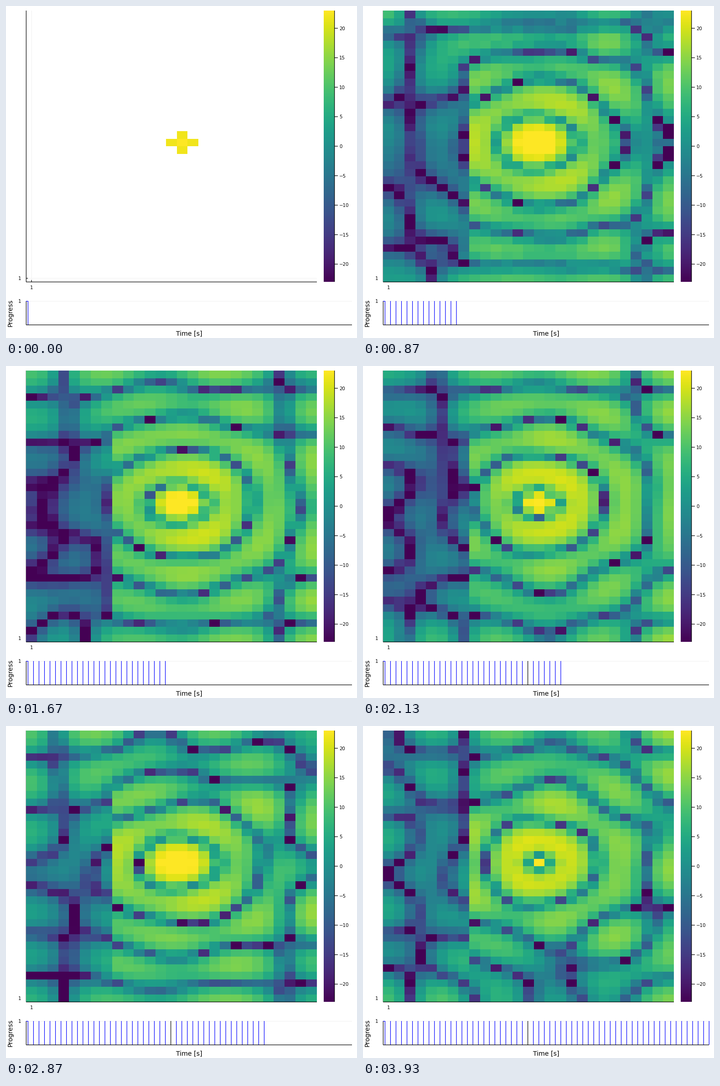
Animation of 770x727 px, one loop 3990 ms. Source, as a matplotlib script:

```python
import numpy as np
import matplotlib.pyplot as plt
from matplotlib.animation import FuncAnimation
from matplotlib.collections import LineCollection

W, H, DPI = 770, 727, 100
LOOP_MS, TICK_MS, FPS = 3990, 10, 15
SHOTS, STEPS_PER_SHOT = 60, 3

ROWS, COLS = 36, 27
SRC = (18, 14)
AMP, PERIOD = 35.0, 15
C2, DAMPING = 0.36, 0.06
WALL, SEALED, WALL_COL = slice(4, 28), slice(4, 21), 7
LEAK, WALL_LOSS = 0.1, 0.2
LIMIT = 23

PX = 72 / DPI
cmap = plt.get_cmap("viridis")


def spread(reached):
    """Grow the touched area by one cell, never through the sealed wall."""
    grown = reached.copy()
    grown[1:] |= reached[:-1]
    grown[:-1] |= reached[1:]
    gate = np.ones((ROWS, COLS - 1), bool)
    gate[SEALED, WALL_COL] = False
    grown[:, 1:] |= reached[:, :-1] & gate
    grown[:, :-1] |= reached[:, 1:] & gate
    return grown


def simulate():
    """Damped wave equation with reflecting edges and a leaky inner wall."""
    u = np.zeros((ROWS, COLS))
    u[SRC] = AMP
    prev = u.copy()
    reached = u != 0
    gate = np.ones((ROWS, COLS - 1))
    gate[WALL, WALL_COL] = LEAK
    keep = np.full_like(u, 1 - DAMPING)
    keep[WALL, WALL_COL + 1] -= WALL_LOSS
    shots = []
    for n in range(STEPS_PER_SHOT * (SHOTS - 1) + 1):
        fx = np.diff(u, axis=1) * gate
        fy = np.diff(u, axis=0)
        lap = np.zeros_like(u)
        lap[:, :-1] += fx
        lap[:, 1:] -= fx
        lap[:-1] += fy
        lap[1:] -= fy
        u, prev = u + keep * (u - prev) + C2 * lap, u
        u[SRC] = AMP * np.cos(2 * np.pi * (n + 1) / PERIOD)
        reached = spread(reached)
        if n % STEPS_PER_SHOT == 0:
            shots.append((u, reached))
    return shots


def to_rgba(u, reached):
    level = 20 * np.log10(np.maximum(np.abs(u), 1e-12))
    rgba = cmap(np.clip((level + LIMIT) / (2 * LIMIT), 0, 1), bytes=True)
    rgba[~reached, 3] = 0
    return rgba


images = [to_rgba(*shot) for shot in simulate()]

plt.rcParams["font.family"] = "DejaVu Sans"
fig = plt.figure(figsize=(W / DPI, H / DPI), dpi=DPI, facecolor="white")
ax = fig.add_axes([0, 0, 1, 1])
ax.axis("off")


def lines(segments, color, z, width=1.2):
    group = LineCollection(segments, colors=color, linewidths=width * PX,
                           zorder=z, snap=False)
    return ax.add_collection(group, autolim=False)


def hline(x0, x1, y):
    return [(x0, y), (x1, y)]


def vline(x, y0, y1):
    return [(x, y0), (x, y1)]


def label(x, y, text, size=10.2, ha="center", va="center_baseline", **kw):
    ax.text(x, y, text, fontsize=size * PX, ha=ha, va=va, **kw)


# Main plot
lines([vline(56, 10, 604), hline(44, 682, 596.3), hline(44, 759, 646.5)],
      "#f2f2f2", 0)
lines([vline(44.3, 10, 604), hline(44, 48, 596.3), vline(56, 600, 604),
       vline(44.3, 646, 698)], "black", 1)
heat = ax.imshow(images[0], extent=(44, 682, 604, 10), origin="lower",
                 interpolation="nearest", aspect="auto", zorder=2)
label(30, 596.5, "1")
label(56, 616.5, "1")

# Colour bar
ax.imshow(np.linspace(0, 1, 594)[:, None], cmap=cmap, aspect="auto",
          extent=(697, 720.5, 604, 10), origin="lower", zorder=2)
values = range(-20, 21, 5)
heights = [307 - v * 297 / LIMIT for v in values]
for v, y in zip(values, heights):
    label(731, y, str(v).replace("-", "\u2212"), ha="left")

# Progress strip
label(30, 646.5, "1")
label(402, 716.5, "Time [s]", 14)
label(9.5, 672, "Progress", 14, va="center", rotation=90)
lines([hline(44, 682, 604.3), hline(44, 759, 698.3), vline(720.7, 10, 604)]
      + [hline(720.7, 728, y) for y in heights], "black", 3)
lines([hline(44, 48.5, 646.5)], "blue", 2)
bars = [vline(48.3 + 12.05 * i, 646, 698) for i in range(SHOTS)]
bar_colors = ["black" if i == 26 else "blue" for i in range(SHOTS)]
marks = lines(bars[:1], bar_colors, 2)

ax.set_xlim(0, W)
ax.set_ylim(H, 0)


def update(i):
    k = int((i + 0.5) * TICK_MS * FPS / 1000)
    heat.set_data(images[k])
    marks.set_segments(bars[:k + 1])
    return heat, marks


anim = FuncAnimation(fig, update, frames=LOOP_MS // TICK_MS, interval=TICK_MS,
                     repeat=True, repeat_delay=0, blit=False)
plt.show()
```
